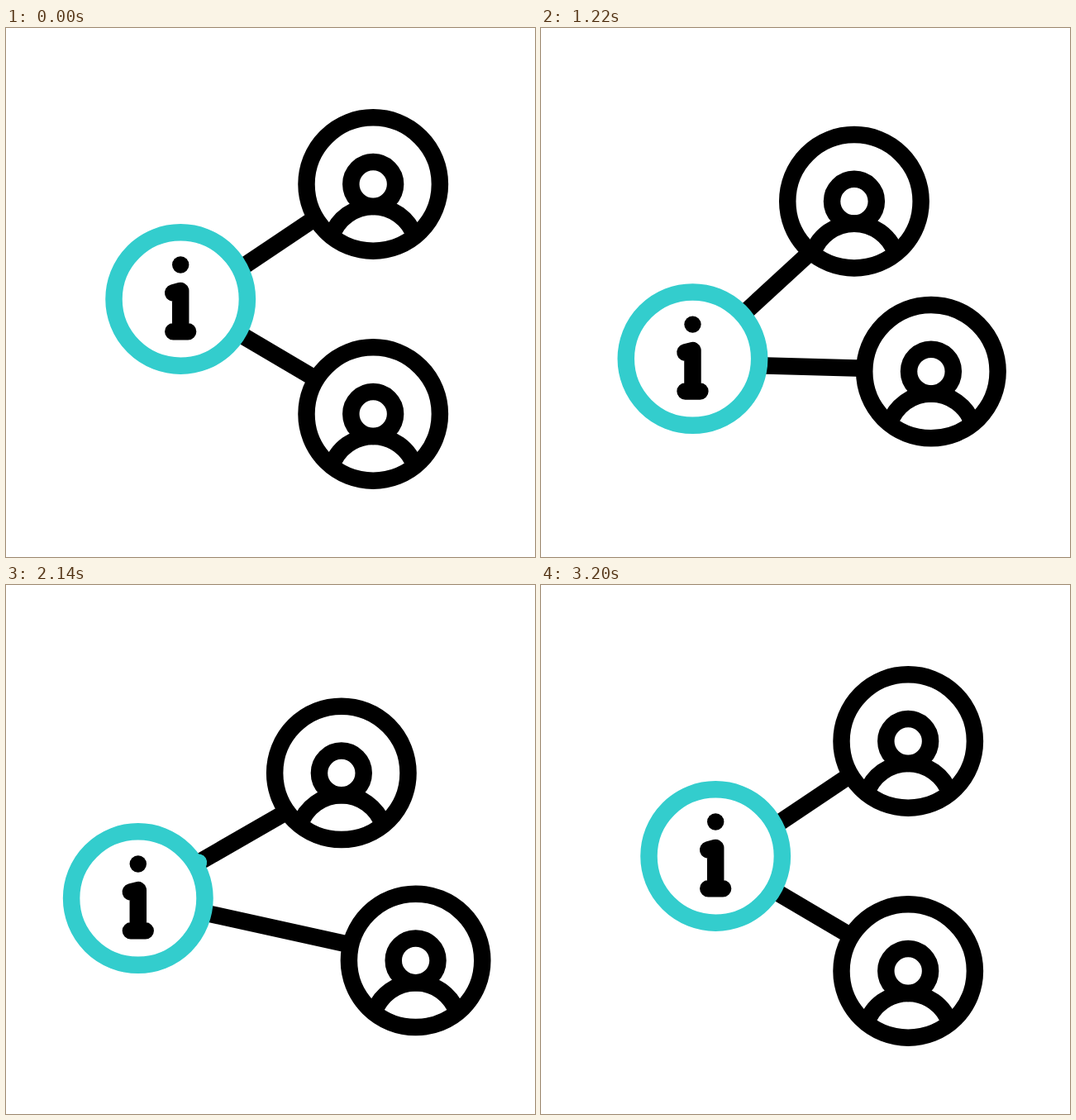
Animation of 640x640 px, one loop 3220 ms. Source, as an HTML page:

```html
<!DOCTYPE html>
<html lang="en">
<head>
<meta charset="utf-8">
<title>Information sharing</title>
<style>
  html, body { margin: 0; width: 100%; height: 100%; overflow: hidden; background: #fff; }
  svg { display: block; width: 100vw; height: 100vh; }
  .line { fill: none; stroke: #000; stroke-width: 20.5; }
  .ring { fill: #fff; }
  .round { stroke-linecap: round; stroke-linejoin: round; }
  .teal { stroke: #33cdcd; }
</style>
</head>
<body>
<svg viewBox="0 0 640 640">
  <defs>
    <g id="person">
      <circle class="line ring" r="80.7"/>
      <path class="line" d="M-50.3 63A53.1 53.1 0 0 1 50.3 63"/>
      <circle class="line" r="26.9"/>
    </g>
  </defs>
  <path id="topLink" class="line"/>
  <path id="lowLink" class="line"/>
  <path id="topPulse" class="line teal round"/>
  <path id="lowPulse" class="line teal round"/>
  <g id="info">
    <circle class="line ring teal" r="80.7"/>
    <circle cy="-41.5" r="10.2"/>
    <path class="line round" d="M-9 -7.6L0 -10V39.3M-8.9 39.3H8.9"/>
  </g>
  <use id="top" href="#person"/>
  <use id="low" href="#person"/>
</svg>
<script>
const LOOP = 3220, STEP = 800, HALF = 2 * STEP;
const SHIFT = 51.4;                  // length of a straight move
const INSET = 74;                    // pulses start and end beneath the rings
const TRAVEL = 360, LAG = 176;       // pulse head duration, tail delay
const ARRIVE = 40, LEAVE = 480;      // pulse starts within each half

// Every node makes two moves, then undoes them in the same order
const nodes = {
  info: { home: [211.2, 328], first: [0, SHIFT], second: [-SHIFT, 38.4] },
  top: { home: [444.2, 189], first: [-SHIFT, 0], second: [-SHIFT / 2, 38.4] },
  low: { home: [444.2, 467], first: [0, -SHIFT], second: [SHIFT, 0] }
};

// Link ends swing vertically around the node centres
const links = [
  { id: 'top', near: { mid: 4.7, amp: 7.7, lag: 0.5 }, far: { mid: 4.8, amp: 10.8, lag: Math.PI } },
  { id: 'low', near: { mid: 2, amp: 4, lag: 2.1 }, far: { mid: -1.5, amp: 0, lag: 0 } }
];

const el = id => document.getElementById(id);
const ease = x => {
  const s = Math.min(1, Math.max(0, x));
  return s * s * (3 - 2 * s);
};
const mix = (a, b, k) => [a[0] + (b[0] - a[0]) * k, a[1] + (b[1] - a[1]) * k];
const segment = (a, b) => `M${a}L${b}`;

function pulsePath(a, b, t, order) {
  const inward = Math.floor(t / HALF) === order;
  const age = t % HALF - (inward ? ARRIVE : LEAVE);
  if (age <= 0 || age >= TRAVEL + LAG) return '';
  const k = INSET / Math.hypot(b[0] - a[0], b[1] - a[1]);
  const ends = [mix(a, b, k), mix(a, b, 1 - k)];
  const [from, to] = inward ? ends.reverse() : ends;
  return segment(mix(from, to, ease((age - LAG) / TRAVEL)), mix(from, to, ease(age / TRAVEL)));
}

function draw(t) {
  const [e0, e1, e2, e3] = [0, 1, 2, 3].map(i => ease(t / STEP - i));
  const angle = (e0 + e1 + e2 + e3) * Math.PI / 2;
  const at = {};
  for (const [id, { home, first, second }] of Object.entries(nodes)) {
    at[id] = home.map((h, i) => h + first[i] * (e0 - e2) + second[i] * (e1 - e3));
    el(id).setAttribute('transform', `translate(${at[id]})`);
  }
  const swing = ([x, y], { mid, amp, lag }) => [x, y + mid + amp * Math.cos(angle - lag)];
  links.forEach(({ id, near, far }, order) => {
    const a = swing(at.info, near), b = swing(at[id], far);
    el(id + 'Link').setAttribute('d', segment(a, b));
    el(id + 'Pulse').setAttribute('d', pulsePath(a, b, t, order));
  });
}

const began = performance.now();
function tick() {
  draw((performance.now() - began) % LOOP);
  requestAnimationFrame(tick);
}
tick();
</script>
</body>
</html>
```
